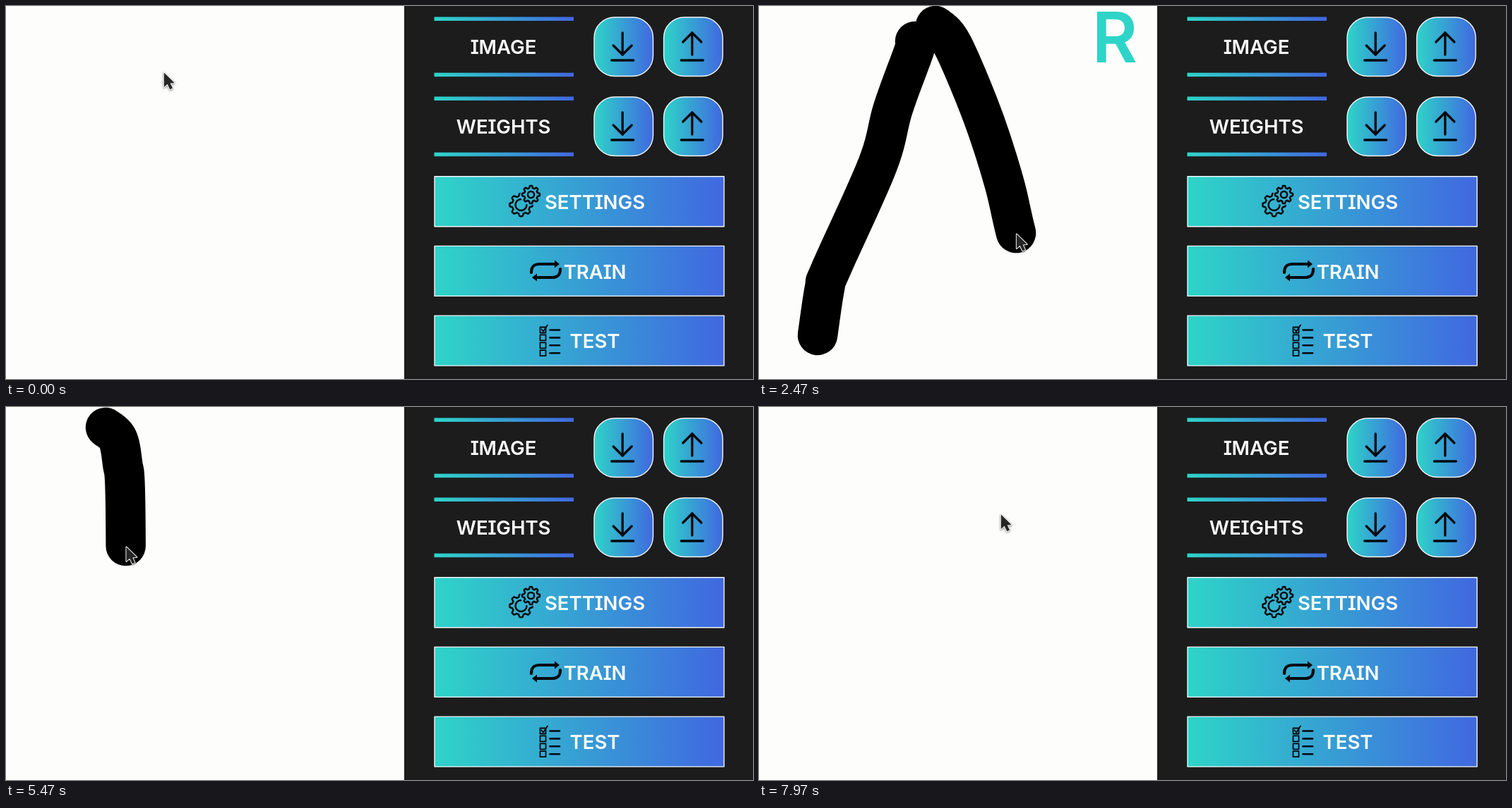
An HTML page with a canvas for the animation above (8 s loop, 1058 px wide and 529 px high).

```html
<!DOCTYPE html>
<html lang="en">
<head>
<meta charset="utf-8">
<title>Letter drawing pad</title>
<style>
html, body { margin: 0; width: 100%; height: 100%; overflow: hidden; background: #fdfefc; }
canvas { display: block; }
</style>
</head>
<body>
<canvas id="stage" width="1058" height="529"></canvas>
<script>
const W = 1058, H = 529, LOOP = 8000;
const TEAL = '#2ed4c8', BLUE = '#4068e0', WHITE = '#fafcfb', INK = '#05080c', PAPER = '#fdfefc';
const CLEAR_A = 4300, CLEAR_B = 7670;
const ctx = document.getElementById('stage').getContext('2d');

// Smooth curve through a few points (Catmull-Rom)
function curve(keys) {
  const at = i => keys[Math.max(0, Math.min(keys.length - 1, i))];
  const pts = [keys[0]];
  for (let i = 0; i < keys.length - 1; i++) {
    for (let s = 1; s <= 10; s++) {
      const u = s / 10;
      pts.push([0, 1].map(k => {
        const [a, b, c, d] = [at(i - 1)[k], at(i)[k], at(i + 1)[k], at(i + 2)[k]];
        return b + u * (c - a + u * (2 * a - 5 * b + 4 * c - d + u * (3 * b - a - 3 * c + d))) / 2;
      }));
    }
  }
  return pts;
}

// Each leg starts where the last one ended
const legs = [];
let hand = [223, 93];
function leg(start, end, clear, keys) {
  legs.push({ start, end, clear, pts: curve([hand, ...keys]) });
  hand = keys[keys.length - 1];
}
const move = (start, end, ...keys) => leg(start, end, 0, keys);
const stroke = leg;

move(0, 400, [221, 50]);
stroke(470, 1238, CLEAR_A, [[220, 62], [190, 145], [168, 225], [102, 373], [93, 400], [83, 467]]);
move(1340, 1880, [250, 28]);
stroke(1930, 2736, CLEAR_A, [[268, 45], [288, 85], [320, 165], [347, 250], [364, 322], [386, 400], [422, 467]]);
move(2820, 3340, [98, 300]);
stroke(3390, 3833, CLEAR_A, [[345, 300]]);
move(4130, 4770, [271, 233]);
move(4800, 5130, [141, 29]);
stroke(5170, 5930, CLEAR_B, [[158, 45], [165, 80], [169, 130], [171, 370], [177, 395], [177, 461]]);
move(5990, 6328, [170, 301], [148, 33]);
stroke(6400, 7370, CLEAR_B, [[250, 52], [304, 135], [195, 235], [310, 285], [320, 370], [178, 453]]);
move(7560, 7970, [342, 151]);

// Recognised letter and the time it shows
const guesses = [['R', 1330, 2800], ['A', 2800, CLEAR_A], ['R', 6030, 7430], ['B', 7430, CLEAR_B]];

// Points of a path up to a share p of its length
function partial(pts, p) {
  const lens = pts.slice(1).map((q, i) => Math.hypot(q[0] - pts[i][0], q[1] - pts[i][1]));
  let left = p * lens.reduce((a, b) => a + b, 0);
  const out = [pts[0]];
  for (let i = 0; i < lens.length && left > 0; i++) {
    const k = Math.min(1, left / lens[i]);
    out.push(pts[i].map((v, n) => v + (pts[i + 1][n] - v) * k));
    left -= lens[i];
  }
  return out;
}

function line(pts, width, close) {
  ctx.lineWidth = width;
  ctx.beginPath();
  pts.forEach(p => ctx.lineTo(p[0], p[1]));
  if (close) ctx.closePath();
  ctx.stroke();
}

function blend(x, w) {
  const g = ctx.createLinearGradient(x, 0, x + w, 0);
  g.addColorStop(0, TEAL);
  g.addColorStop(1, BLUE);
  return g;
}

function box(x, y, w, h, r) {
  ctx.beginPath();
  ctx.roundRect(x, y, w, h, r);
  ctx.fillStyle = blend(x, w);
  ctx.fill();
  ctx.strokeStyle = '#f2f6f8';
  ctx.lineWidth = 1.4;
  ctx.stroke();
}

// Text centred on cx; the capital I gets slab ends
function label(text, cx, base) {
  const SLAB = 11.5;
  ctx.font = '600 27.6px Inter, "Open Sans", sans-serif';
  ctx.textAlign = 'left';
  ctx.fillStyle = WHITE;
  const parts = text.split(/(I)/);
  const width = s => s === 'I' ? SLAB : ctx.measureText(s).width;
  let x = cx - parts.reduce((sum, s) => sum + width(s), 0) / 2;
  for (const s of parts) {
    if (s === 'I') {
      ctx.fillText(s, x + (SLAB - ctx.measureText(s).width) / 2, base);
      for (const y of [20.1, 3]) ctx.fillRect(x + 0.7, base - y, SLAB - 1.4, 3);
    } else {
      ctx.fillText(s, x, base);
    }
    x += width(s);
  }
}

// Arrow pointing down (dir 1) or up (dir -1) over a bar
function arrowIcon(cx, y, dir) {
  const tip = y + 53.5 + dir * 15.5;
  line([[cx, tip - dir * 31], [cx, tip]], 3.3);
  line([[cx - 13, tip - dir * 13], [cx, tip], [cx + 13, tip - dir * 13]], 3.3);
  line([[cx - 15.5, y + 77], [cx + 15.5, y + 77]], 3.3);
}

// Rounded teeth from a wave around the rim
function gear(cx, cy, r, tooth, hole, to) {
  const rim = [];
  for (let i = 0; i < 96; i++) {
    const a = i / 96 * 2 * Math.PI;
    const d = r + tooth * Math.tanh(3 * Math.cos(8 * a));
    rim.push([cx + d * Math.cos(a), cy + d * Math.sin(a)]);
  }
  line(rim, 2.5, true);
  ctx.beginPath();
  ctx.arc(cx, cy, hole, 0, to);
  ctx.stroke();
}

function gearsIcon() {
  gear(743.5, 267.5, 11, 1.5, 4.6, 7);
  ctx.save();
  ctx.beginPath();
  ctx.rect(700, 240, 70, 72);
  ctx.arc(743.5, 267.5, 15, 0, 7);
  ctx.clip('evenodd');
  gear(729.5, 282, 14.4, 1.8, 8, 4.8);
  ctx.restore();
}

// Half of the loop, then the same turned by 180 degrees
function loopIcon() {
  const half = new Path2D('M-20.5 2.5C-20.5-6.5-16.5-9.5-8.5-9.5H13.5');
  const head = new Path2D('M12.5-15L19.5-9.5L12.5-4Z');
  ctx.save();
  ctx.translate(764.5, 375.5);
  ctx.lineWidth = 4.2;
  for (let i = 0; i < 2; i++) {
    ctx.stroke(half);
    ctx.fill(head);
    ctx.rotate(Math.PI);
  }
  ctx.restore();
}

function listIcon() {
  for (let i = 0; i < 4; i++) {
    const y = 455.5 + i * 10.9;
    ctx.lineWidth = 1.8;
    ctx.strokeRect(756.5, y, 8, 8);
    line([[770.5, y + 4], [784, y + 4]], 2.6);
  }
  line([[758.5, 458.5], [761, 461.5], [767, 452.5]], 1.8);
}

function panel() {
  ctx.fillStyle = '#1c1c1c';
  ctx.fillRect(564, 0, W - 564, H);
  ['IMAGE', 'WEIGHTS'].forEach((text, i) => {
    const y = i * 113;
    ctx.fillStyle = blend(606.5, 197.5);
    for (const top of [15.5, 94.7]) ctx.fillRect(606.5, y + top, 197.5, 5.5);
    label(text, 704.7, y + 68);
    for (const dir of [1, -1]) {
      const cx = 924 - dir * 49.3;
      box(cx - 41.7, y + 16, 83.5, 83.5, 29);
      ctx.strokeStyle = INK;
      arrowIcon(cx - 1.5, y, dir);
    }
  });
  ['SETTINGS', 'TRAIN', 'TEST'].forEach((text, i) => {
    const y = 241.7 + i * 98.7;
    box(607, y, 410, 71, 0);
    label(text, 834, Math.round(y + 46.3));
  });
  ctx.strokeStyle = ctx.fillStyle = INK;
  gearsIcon();
  loopIcon();
  listIcon();
}

const arrow = new Path2D('M.8 1.5V22L5.6 17.8L9.2 25.3L13 23.6L9.6 16.4L15.6 16Z');
function pointer(x, y) {
  ctx.save();
  ctx.translate(x, y);
  ctx.shadowColor = 'rgba(0,0,0,.5)';
  ctx.shadowBlur = 3;
  ctx.shadowOffsetY = 1;
  ctx.strokeStyle = '#f4f4f4';
  ctx.lineWidth = 2;
  ctx.stroke(arrow);
  ctx.shadowColor = 'transparent';
  ctx.fillStyle = '#262626';
  ctx.fill(arrow);
  ctx.restore();
}

function draw(t) {
  ctx.fillStyle = PAPER;
  ctx.fillRect(0, 0, W, H);
  ctx.lineCap = ctx.lineJoin = 'round';
  ctx.strokeStyle = '#000';
  let tip = legs[0].pts[0];
  for (const { start, end, clear, pts } of legs) {
    if (t < start) break;
    let p = Math.min(1, (t - start) / (end - start));
    if (!clear) p = p * p * (3 - 2 * p);
    const path = partial(pts, p);
    tip = path[path.length - 1];
    if (t < clear) line(path, 56.5);
  }
  const guess = guesses.find(g => t >= g[1] && t < g[2]);
  if (guess) {
    ctx.font = '600 99px Inter, "Open Sans", sans-serif';
    ctx.textAlign = 'right';
    ctx.fillStyle = TEAL;
    ctx.fillText(guess[0], 536, 80);
  }
  panel();
  pointer(tip[0], tip[1]);
}

// 30 steps a second, rounded to 10 ms
function tick() {
  const t = performance.now() % LOOP;
  const step = Math.floor((t + 3.5) * 0.03);
  draw(Math.round(step * 10 / 3) * 10);
  requestAnimationFrame(tick);
}
tick();
</script>
</body>
</html>
```
